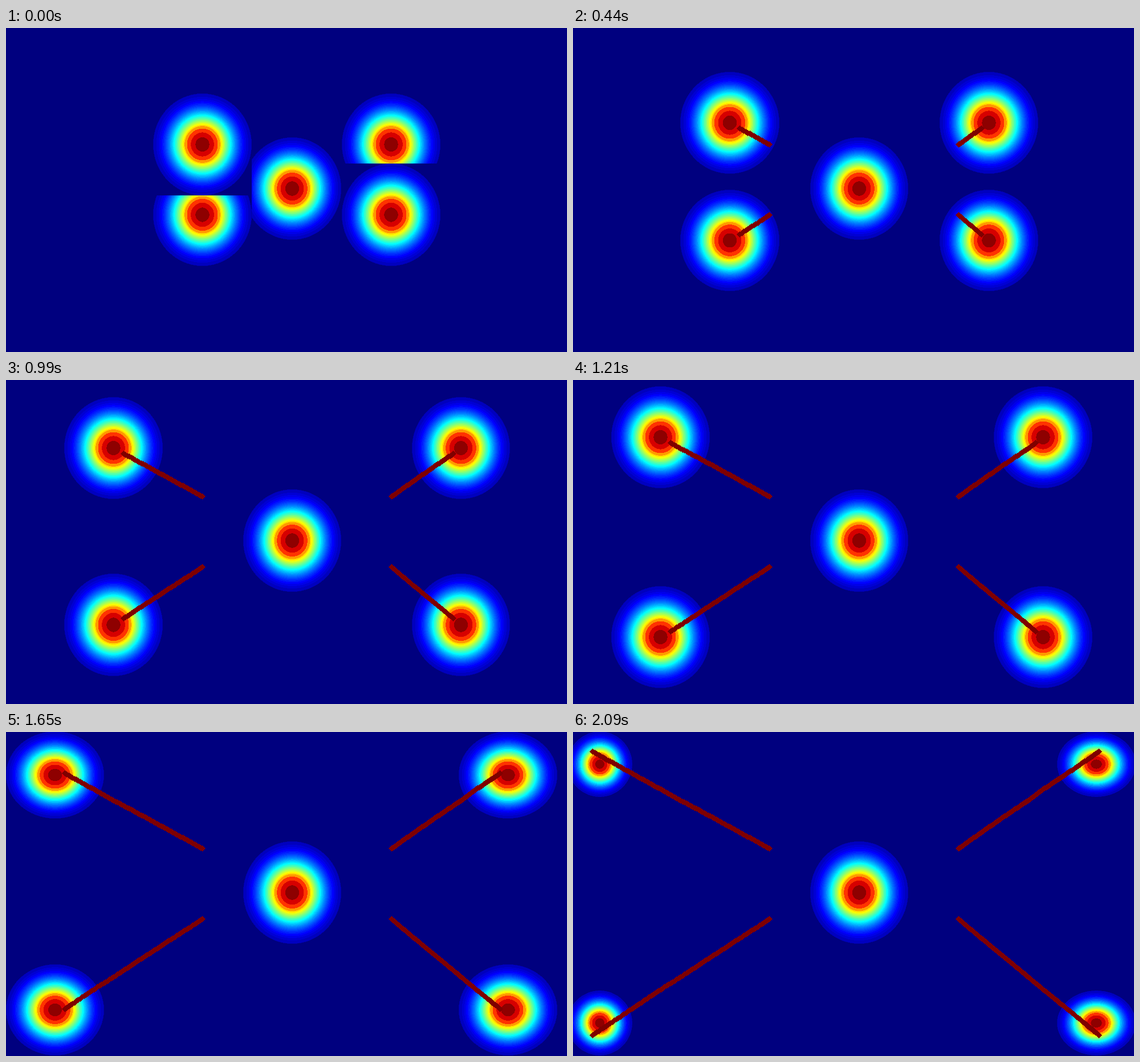
These frames come from a looping animation (984x569 px, 2200 ms). A matplotlib script:

```python
import numpy as np
import matplotlib.pyplot as plt
from matplotlib.animation import FuncAnimation

W, H, DPI = 984, 569, 64
FRAMES, STEP_MS = 20, 110
HALF_W, HALF_H = 86.5, 89.5
X_LIMITS, Y_LIMITS = (-10, 987), (-1, 568)

# Tracked centres, interpolated between a few key steps
KEYS = [0, 4, 7, 9, 11, 15, 19]
LEFT = [344.5, 275, 223, 188.3, 153.5, 86, 17]
RIGHT = [675.5, 729.3, 770.7, 798, 824.3, 880.3, 935.5]
TOP = [204.5, 166.4, 138, 119.8, 100.3, 62.8, 25]
BOTTOM = [328, 373, 407, 430, 451.8, 497.3, 543]
CENTER = (502, 282)
# Later boxes overwrite earlier ones
TRACKS = [(LEFT, BOTTOM), (LEFT, TOP), (RIGHT, TOP), (RIGHT, BOTTOM)]

# Flat bands near the hot core: outer radius and heat value
BAND_EDGES = [0.14, 0.235, 0.312, 0.36]
BAND_HEAT = np.array([0.985, 0.915, 0.825, 0.725])

ROWS, COLS = np.mgrid[0:H, 0:W]


def jet(v):
    ramps = [1.5 - np.abs(4 * v - c) for c in (3, 2, 1)]
    return (np.clip(np.stack(ramps, -1), 0, 1) * 255).astype(np.uint8)


def track_pos(track, i):
    return tuple(np.interp(i, KEYS, axis) for axis in track)


def span(c, half, limits):
    return np.clip(np.round([c - half, c + half]), *limits)


def stamp_blob(heat, x, y):
    x0, x1 = span(x, HALF_W, X_LIMITS)
    y0, y1 = span(y, HALF_H, Y_LIMITS)
    box = np.s_[max(int(y0), 0):int(y1), max(int(x0), 0):int(x1)]
    dx = (COLS[box] + 0.5 - (x0 + x1) / 2) / ((x1 - x0) / 2)
    dy = (ROWS[box] + 0.5 - (y0 + y1) / 2) / ((y1 - y0) / 2)
    rho = np.hypot(dx, dy)
    v = np.round(np.exp(-3 * rho ** 2) * 48) / 48
    band = np.digitize(rho, BAND_EDGES)
    v = np.where(band < 4, BAND_HEAT[np.minimum(band, 3)], v)
    heat[box] = np.where(rho <= 1, v, 0)


def stamp_dot(heat, x, y, r=5):
    x, y = int(round(x)), int(round(y))
    box = np.s_[max(y - r, 0):y + r + 1, max(x - r, 0):x + r + 1]
    inside = np.abs(COLS[box] - x) + np.abs(ROWS[box] - y) <= r
    heat[box][inside] = 1


def render(i):
    heat = np.zeros((H, W))
    stamp_blob(heat, *CENTER)
    for track in TRACKS:
        stamp_blob(heat, *track_pos(track, i))
    # Trails lag one step behind the blobs
    if i > 0:
        for track in TRACKS:
            for s in np.linspace(0, i - 1, 5 * (i - 1) + 1):
                stamp_dot(heat, *track_pos(track, s))
    return jet(heat)


fig = plt.figure(figsize=(W / DPI, H / DPI), dpi=DPI)
ax = fig.add_axes([0, 0, 1, 1])
ax.axis("off")
image = ax.imshow(render(0), interpolation="nearest", aspect="auto")


def update(i):
    image.set_data(render(i))
    return [image]


anim = FuncAnimation(fig, update, frames=FRAMES, interval=STEP_MS,
                     repeat=True, repeat_delay=0, blit=False)
plt.show()
```
